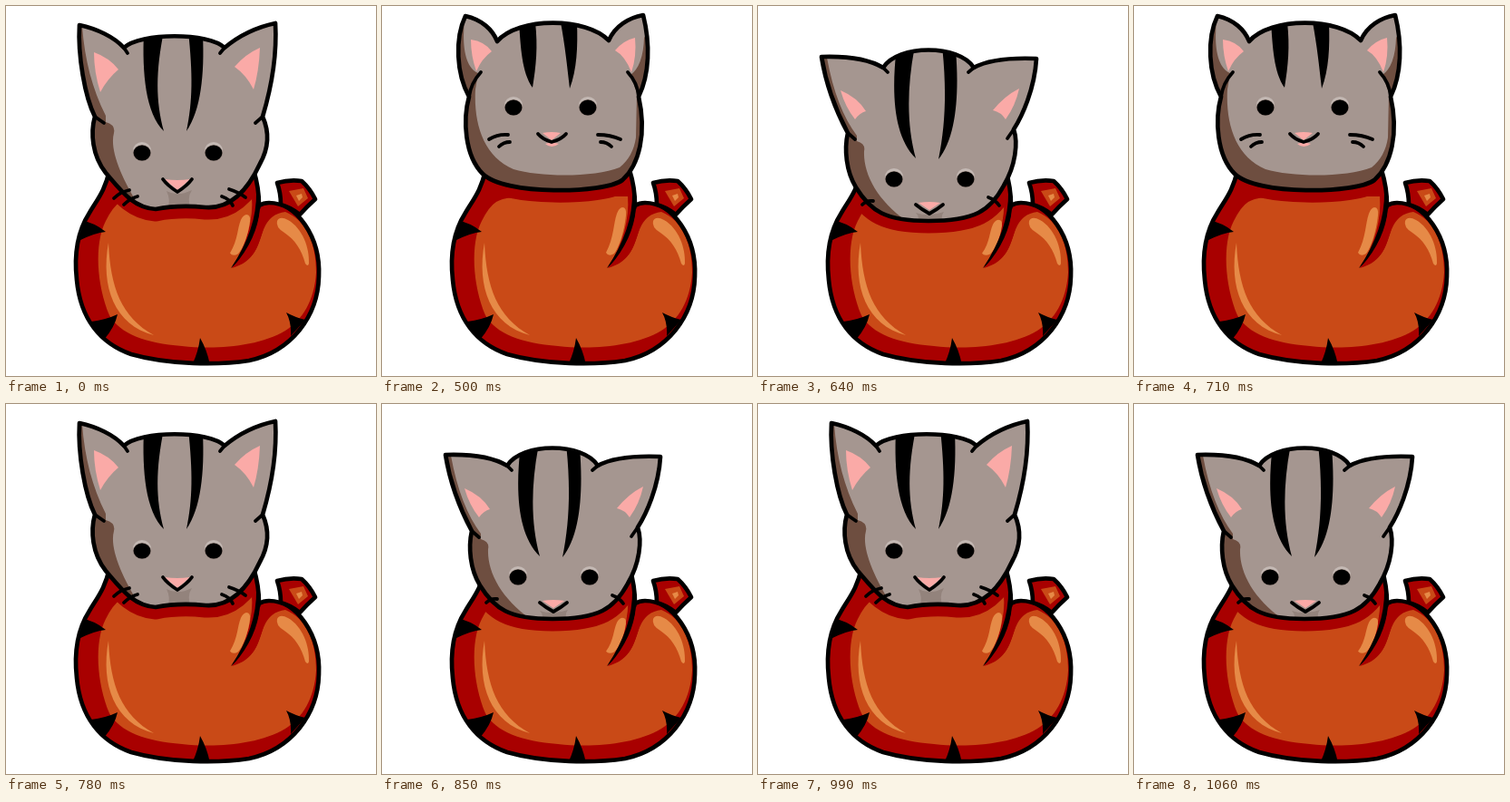
Animation of 408 by 408 pixels, one loop 1130 ms. Source, as an HTML page:

```html
<!DOCTYPE html>
<html lang="en">
<head>
<meta charset="utf-8">
<title>Bobbing cat</title>
<style>
html, body { margin: 0; width: 100%; height: 100%; overflow: hidden; background: #fff; }
svg { display: block; width: 100vw; height: 100vh; }
.line { fill: none; stroke: #000; stroke-width: 4.7; stroke-linejoin: round; stroke-linecap: round; }
.thin { stroke-width: 3.8; }
.shade { fill: none; stroke: #a80000; stroke-width: 27; }
.fur { fill: #a59690; }
.brown { fill: #6e4e40; }
.muzzle { fill: #93837c; }
.pink { fill: #faaaa7; }
.red { fill: #a80000; }
.orange { fill: #c94a17; }
.glow { fill: #e68a47; }

.mid, .up, .down { visibility: hidden; animation: 1130ms step-end infinite; }
.mid { animation-name: mid; }
.up { animation-name: up; }
.down { animation-name: down; }
@keyframes mid {
  0%, 50.44%, 69.02%, 87.61% { visibility: visible; }
  44.24%, 56.63%, 75.22%, 93.8%, 100% { visibility: hidden; }
}
@keyframes up {
  0%, 50.44%, 69.02%, 87.61%, 100% { visibility: hidden; }
  44.24%, 62.83%, 81.41% { visibility: visible; }
}
@keyframes down {
  0%, 62.83%, 81.41%, 100% { visibility: hidden; }
  56.63%, 75.22%, 93.8% { visibility: visible; }
}
</style>
</head>
<body>
<svg viewBox="0 0 408 408">
  <defs>
    <path id="body" d="M114 181C110 202 101 213 92 228C78 250 75 275 78 302C82 345 104 372 138 384C180 396 235 396 268 391C315 381 344 342 345 298C347 255 321 217 290 217Q284 217 279 220Q279 200 273 181Z"/>
    <path id="knot" d="M299 195Q313 191 326 193Q335 201 341 213Q332 221 324 230Q314 222 303 219Q303 206 299 195Z"/>
    <path id="head-mid" d="M81 21C100 25 119 34 130 46C148 29 224 29 241 46C259 31 278 23 297 19C299 54 292 92 283 122C291 140 289 158 280 174C268 200 250 224 220 222Q190 219 165 224C140 222 128 205 110 184C95 165 93 140 98 122C87 100 79 55 81 21Z"/>
    <path id="head-up" d="M92 11C110 15 122 26 127 39C150 12 226 12 250 38C257 22 272 13 288 10C296 42 295 75 283 100C292 140 284 175 265 192C245 207 135 209 111 185C91 165 89 125 96 100C82 75 80 36 92 11Z"/>
    <path id="head-down" d="M70 56C100 55 123 59 138 68C154 42 222 42 238 68C256 58 282 57 307 58C305 92 291 122 282 136C287 151 284 176 271 198C256 226 239 237 188 237C140 237 124 226 108 200C97 182 95 158 99 140C91 125 76 93 70 56Z"/>
    <path id="glint" d="M265 222Q270 222 269 231C267 250 261 267 256 273Q250 277 247 272C256 255 255 240 259 229Q261 223 265 222Z"/>
    <g id="eye">
      <ellipse cy="-2.5" rx="10" ry="9.5" fill="#c4b9b4"/>
      <ellipse rx="10" ry="9" fill="#8b7a73"/>
      <ellipse rx="9.4" ry="8.6"/>
    </g>
    <clipPath id="in-body"><use href="#body"/></clipPath>
    <clipPath id="in-mid"><use href="#head-mid"/></clipPath>
    <clipPath id="in-up"><use href="#head-up"/></clipPath>
    <clipPath id="in-down"><use href="#head-down"/></clipPath>
  </defs>

  <use href="#knot" class="red"/>
  <path class="orange" d="M312 204L328 201L333 212L322 221Z"/>
  <path class="glow" d="M320 209L326 207L327 211L323 215Z"/>
  <use href="#knot" class="line"/>

  <use href="#body" class="red"/>
  <g clip-path="url(#in-body)">
    <path class="orange" d="M126 216Q140 208 190 210H271C273 234 266 262 249 289C275 282 278 263 284 246Q291 229 308 227C331 236 342 262 342 294C340 325 327 346 308 358C278 376 230 379 194 375C154 372 125 361 114 341C100 308 97 262 110 237Q118 221 126 216Z"/>
    <use href="#head-mid" class="shade mid"/>
    <use href="#head-up" class="shade up"/>
    <use href="#head-down" class="shade down"/>
    <path d="M82 236Q98 239 110 249Q98 250 80 259ZM94 348Q110 346 123 340Q120 354 108 368ZM205 396Q212 382 214 366Q222 380 225 396ZM309 338Q318 343 330 346L314 364Q315 349 309 338Z"/>
  </g>
  <path class="glow" d="M113 261C115 310 127 343 163 363C120 352 104 310 113 261ZM299 237Q302 231 311 236C327 245 335 267 334 284Q333 288 330 284C326 269 319 258 307 250Q297 244 299 237Z"/>
  <use href="#glint" class="glow up"/>
  <use href="#glint" class="glow mid" transform="translate(0 41.2) scale(1 .85)"/>
  <use href="#glint" class="glow down" transform="translate(0 71.5) scale(1 .74)"/>
  <use href="#body" class="line"/>
  <path d="M276 205Q277 246 248 289Q276 268 281 220Z"/>
  <path class="red" d="M280 224Q277 257 251 287C276 281 278 262 284 246Q289 232 302 223Q290 217 280 224Z"/>

  <g class="mid">
    <g clip-path="url(#in-mid)">
      <use href="#head-mid" class="fur"/>
      <path class="brown" d="M70 10L84 23C87 60 95 91 110 121V128Q121 131 119 140C114 159 127 190 151 228H80Z"/>
      <path class="muzzle" d="M177 204Q189 211 205 203Q199 212 204 224H178Q182 214 177 204Z"/>
      <path d="M152 28H174C165 72 165 105 174 138C154 118 150 75 152 28ZM201 28L217 32C219 75 215 115 199 138C206 105 206 75 201 28Z"/>
    </g>
    <path class="pink" d="M97 51Q114 57 124 70Q112 80 104 95Q97 73 97 51ZM280 46Q279 72 273 92Q265 76 252 67Q264 53 280 46ZM175 191Q189 193 203 191L189 203Z"/>
    <use href="#eye" x="150" y="162"/><use href="#eye" x="229" y="162"/>
    <use href="#head-mid" class="line"/>
    <path class="line thin" d="M130 46L134 52M241 46L236 52M98 122L108 129M283 122L275 129M173 191Q178 198 189 205Q200 198 205 191M119 212Q126 205 136 203M130 219Q137 212 145 210M246 202Q256 205 264 211M238 210Q247 213 250 220"/>
  </g>

  <g class="up">
    <g clip-path="url(#in-up)">
      <use href="#head-up" class="fur"/>
      <path class="brown" d="M80 8L91 16C88 45 92 68 106 74L103 92C101 130 112 166 145 180C175 189 235 189 262 178Q277 166 280 145L281 96L274 76Q288 66 289 35L300 15V215H75Z"/>
      <path d="M151 18H169C172 45 170 66 166 90C154 73 153 45 151 18ZM197 18H215C216 45 215 70 207 91C204 65 202 45 197 18Z"/>
    </g>
    <path class="pink" d="M98 37Q113 39 121 50Q110 58 104 72Q98 55 98 37ZM279 35Q281 56 275 73Q268 55 257 49Q266 38 279 35ZM177 140Q187 138 197 140L187 148ZM180 152Q187 149 195 152Q187 158 180 152Z"/>
    <use href="#eye" x="145" y="112"/><use href="#eye" x="227" y="112"/>
    <use href="#head-up" class="line"/>
    <path class="line thin" d="M109 73Q98 85 96 100M271 73Q282 85 283 100M172 141Q177 147 187 150Q198 147 203 141M118 147Q128 141 139 142M129 155Q134 150 141 150M238 142Q252 142 263 147M241 150Q248 150 253 155"/>
  </g>

  <g class="down">
    <g clip-path="url(#in-down)">
      <use href="#head-down" class="fur"/>
      <path class="brown" d="M60 50L76 57C83 95 94 123 109 143V149Q119 152 117 160C116 186 132 215 165 238H80Z"/>
      <path class="muzzle" d="M174 228Q189 233 205 227Q201 232 204 239H176Q179 233 174 228Z"/>
      <path d="M153 44H173C164 90 164 132 174 168C149 143 147 95 153 44ZM203 44L218 48C222 95 219 145 199 169C207 130 208 90 203 44Z"/>
    </g>
    <path class="pink" d="M91 93Q110 101 119 116Q112 118 107 125Q96 111 91 93ZM288 91Q284 110 273 125Q268 117 259 115Q272 99 288 91ZM177 217Q189 215 201 217L189 225Z"/>
    <use href="#eye" x="150" y="191"/><use href="#eye" x="229" y="191"/>
    <use href="#head-down" class="line"/>
    <path class="line thin" d="M138 68L143 73M238 68L232 73M99 140L107 147M282 136L275 146M174 219Q180 224 189 229Q198 224 204 219M115 219Q120 214 127 215M254 211Q262 214 266 220"/>
  </g>
</svg>
</body>
</html>
```
